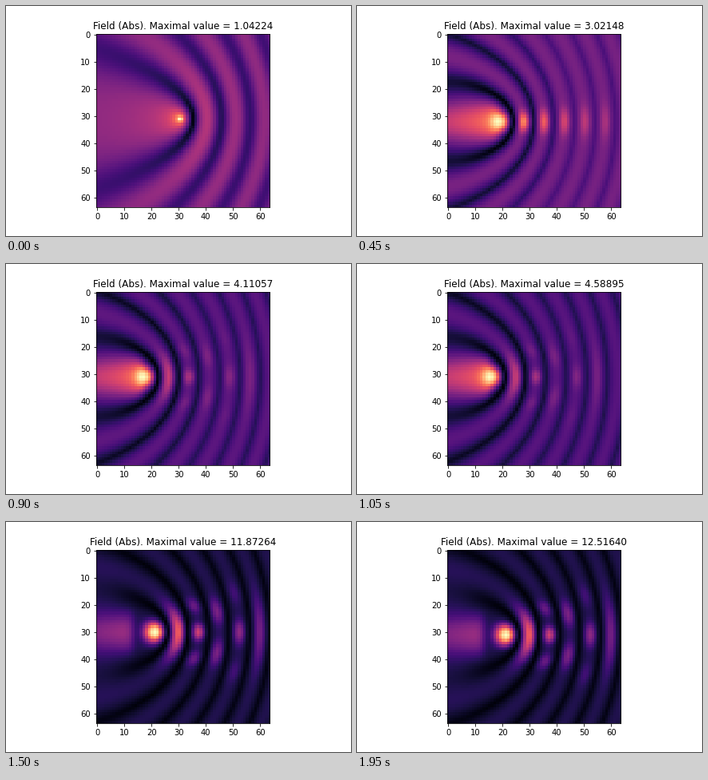
Animation, 432 px wide and 288 px high, one loop 2.1 s. Source, as a matplotlib script:

```python
import numpy as np
import matplotlib.pyplot as plt
from matplotlib.animation import FuncAnimation

N = 64
FRAMES = 14
START, JUMP = 3, 10        # focus fully formed; sudden gain in intensity
SPACING, NODE = 7.5, 4.8   # fringe period and first dark fringe
PITCHES = (80, 10.5, 18, 16, 80)   # lobe distance along each ring
PEAKS = {0: 1.04224, 3: 3.02148, 5: 3.63220, 7: 4.58895, 9: 5.21983,
         10: 11.87264, 11: 12.36832, 13: 12.51640}

Y, X = np.mgrid[0:N, 0:N].astype(float)


def ramp(i, start, end):
    return np.clip((i - start) / (end - start), 0, 1)


def gauss(t, width):
    return np.exp(-((t / width) ** 2))


def step(t):
    return 1 / (1 + np.exp(-np.clip(t, -40, 40)))


def norm(*parts):
    return np.sqrt(sum(p**2 for p in parts))


def scatter():
    """Plane wave meeting the cylindrical wave of a point scatterer."""
    dx, dy = X - 30.4, Y - 31
    r = np.hypot(dx, dy)
    phase = np.pi + 2 * np.pi / 21 * (r + dx - 9.5)
    v = abs(1 + 2 / np.sqrt(r + 0.35) * np.exp(1j * phase))
    return v / v.max()


def ring(n, s, dy, split):
    """Fringe n beyond the focus, breaking into lobes as split grows."""
    turn = np.pi * dy / PITCHES[n - 1]
    lobes = np.sin(turn) ** 2 if n == 3 else np.cos(turn) ** 2
    spread = (8 + 2.2 * n) * (0.45 + 0.55 * split)
    level = 0.83 ** (n - 1) * (1 - 0.8 * split * (1 - lobes))
    return level * gauss(s - NODE - SPACING * (n - 0.5), 3.5) * gauss(dy, spread)


def focus(i):
    """Beam from the left, bright focus and curved fringes behind it."""
    late = i >= JUMP
    split = ramp(i, START, 5)
    if late:
        x, y = 21, 30 + ramp(i, 11, 13)
        base, gain, left, lead = 0.14, 0.66, 0.36, 8
    else:
        x, y = 19 - 3 * ramp(i, 5, 7), 32 - split
        base = 0.29 + 0.13 * np.exp((START - i) / 2.5)
        gain, left, lead = 0.82 - 0.27 * split, 0.56, 0

    dx, dy = X - x, Y - y
    s = (np.hypot(dx, dy) + 0.8 * dx) / 1.8
    wave = abs(np.sin(np.pi * (np.maximum(s, 1.1) - NODE) / SPACING))

    beam = left * (1 + 0.6 * np.clip(X / x, 0, 1) ** 2)
    beam = beam * gauss(dy, 9) * step(x - lead - X)
    spot = gauss(np.hypot(dx, dy), 4.2)
    rings = [gain * ring(n, s, dy, split) for n in range(1, 6)]

    wash = 1.6 * base * ramp(s, NODE, 25)
    ripple = base * (wash + (1 - wash) * wave)
    glow = 0.17 * gauss(X, 13) * gauss(dy, 25)
    v = norm(wave * norm(beam, spot, *rings), ripple, glow)
    return v / v.max()


def field(i):
    if i >= START:
        return focus(i)
    t = 1 - (1 - i / START) ** 2
    return (1 - t) * scatter() + t * focus(START)


plt.rcParams.update({"font.family": "DejaVu Sans", "font.size": 10})
fig, ax = plt.subplots(figsize=(6, 4), dpi=72)
fig.subplots_adjust(left=0.125, right=0.9, bottom=0.125, top=0.88)
image = ax.imshow(field(0), cmap="magma", vmin=0, vmax=1,
                  interpolation="nearest")
ax.set_xticks(range(0, N, 10))
ax.set_yticks(range(0, N, 10))
title = ax.set_title("")


def update(i):
    peak = np.interp(i, list(PEAKS), list(PEAKS.values()))
    image.set_data(field(i))
    title.set_text(f"Field (Abs). Maximal value = {peak:.5f}")
    return image, title


anim = FuncAnimation(fig, update, frames=FRAMES, interval=150,
                     repeat=True, repeat_delay=0, blit=False)
plt.show()
```
